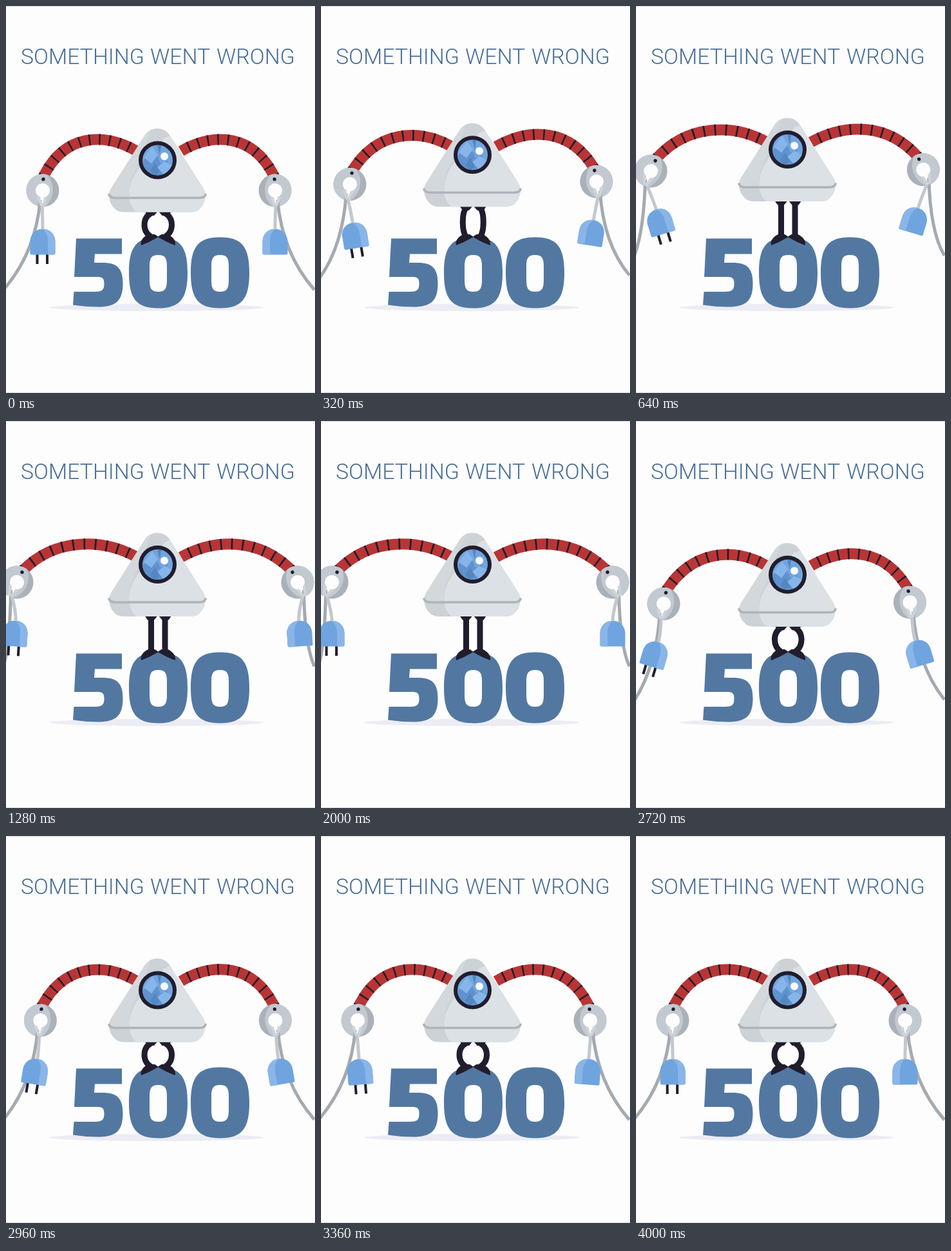
These frames come from a looping animation (480x600 px, 4.08 s). An HTML page:

```html
<!DOCTYPE html>
<html lang="en">
<head>
<meta charset="utf-8">
<title>Something went wrong</title>
<style>
  html, body { margin: 0; width: 100%; height: 100%; overflow: hidden; background: #fdfdfd; }
  svg { display: block; width: 480px; height: 600px; }
  .title { font: 300 33.8px Roboto, "Open Sans", sans-serif; fill: #476d97; }
  .line { fill: none; }
  .dark { fill: #211d2d; }
  .arm { stroke: #b93535; stroke-width: 17; }
  .bands { stroke: #211d2d; stroke-width: 17; stroke-dasharray: .16 .84; stroke-dashoffset: -.8; }
  .cable { stroke: #a5aab1; stroke-width: 5; }
  .cord { stroke: #c3c8cf; stroke-width: 5; }
  .leg { stroke: #211d2d; stroke-width: 9; }
</style>
</head>
<body>
<svg viewBox="0 0 480 600">
  <defs>
    <clipPath id="shell">
      <path id="outline" d="M160 294C160 288 163 283 167 277L214 203C219 194 226 190 235 190S251 194 256 203L303 277C307 283 310 288 310 294C309 302 307 308 303 312Q298 319.5 287 319.5H183Q172 319.5 167 312C163 308 161 302 160 294Z"/>
    </clipPath>
    <clipPath id="lens"><circle cx="235.5" cy="239" r="23.5"/></clipPath>
    <path id="zero" fill-rule="evenodd" d="M0-55C35-55 45.5-39 45.5 0S35 55 0 55S-45.5 39-45.5 0S-35-55 0-55ZM0-27.5C-11-27.5-13.5-22-13.5-10V11C-13.5 24-11 29.5 0 29.5S13.5 24 13.5 11V-10C13.5-22 11-27.5 0-27.5Z"/>
    <path id="foot" class="dark" d="M210 371C208 364 213 358 221 354H231L237 358L222 366Z"/>
    <path id="hip" class="dark" d="M215.5 318.5H235.5L230 325H220Z"/>
  </defs>

  <path d="M0 .5H480M0 599.5H480" stroke="#d6d8df"/>
  <text class="title" y="90"><tspan x="23">SOMETHING</tspan><tspan x="224">WENT</tspan><tspan x="327">WRONG</tspan></text>

  <ellipse cx="234" cy="467.5" rx="167" ry="5.5" fill="#ececf4"/>
  <g fill="#5278a2" role="img" aria-label="500">
    <path d="M109 360.5H180V384.500H138L137 398H150C173 398 181.500 407 181.500 430C181.500 457 171 466.500 143 466.500Q123 466.500 104 463.500L105.500 443H138C149 443 152.500 440 152.500 431C152.500 422 150 420 141 420H106Z"/>
    <use href="#zero" x="236.500" y="413.500"/>
    <use href="#zero" x="332.500" y="413.500"/>
  </g>

  <g id="left"></g>
  <g id="right" transform="matrix(-1 0 0 1 475 0)"></g>

  <path class="line leg" id="legL"/>
  <path class="line leg" id="legR" transform="matrix(-1 0 0 1 472.500 0)"/>
  <use href="#foot"/>
  <use href="#foot" transform="matrix(-1 0 0 1 472.500 0)"/>

  <g id="body">
    <use href="#hip"/>
    <use href="#hip" transform="matrix(-1 0 0 1 472.500 0)"/>
    <use href="#outline" fill="#cdd2d7"/>
    <g clip-path="url(#shell)">
      <path d="M150 300L216 190H226L203 250C193 268 191 275 191 298H150Z" fill="#d3d8dc"/>
      <path d="M191.500 298C191 277 196 268 205 254L246 205L262 198L320 290V325H214C201 322 193 311 191.500 298Z" fill="#dce1e6"/>
    </g>
    <path class="line" d="M159.500 291Q161 297.500 169 297.500H301Q309 297.500 310.500 291" stroke="#afb4bb" stroke-width="3.500"/>
    <circle cx="235.500" cy="239" r="29.500" class="dark"/>
    <g clip-path="url(#lens)">
      <path d="M211 214H260V264H211Z" fill="#72a5de"/>
      <path d="M211 242L220 233L226 243L232 226L240 244L251 239L246 264H211Z" fill="#5f92ce"/>
      <path d="M214 235L227 218L236 231L226 244ZM235 250L246 241L258 247L246 263Z" fill="#86b5e9"/>
      <path d="M224 255L232 243L239 257L231 263ZM235 216L241 216L239 231Z" fill="#5486c0"/>
    </g>
    <circle cx="246" cy="233" r="6" fill="#f8fbff"/>
  </g>
</svg>

<script>
const LOOP = 4080, HALF = LOOP / 2, STEP = 80;
const REST = { x: 57, y: 286 };

// up/down: how long an arm takes to open and close; bow: how late in its reach the hand rises.
const hands = {
  left: { reach: 40, bow: 2.2, up: 860, down: 1140 },
  right: { reach: 35, bow: 1, up: 900, down: 980 }
};

const $ = id => document.getElementById(id);

function ease(time, duration) {
  const u = Math.min(Math.max(time / duration, 0), 1);
  return (1 - Math.cos(Math.PI * u)) / 2;
}

// Goes 0 to 1 in the first half of the loop and back to 0 in the second.
const raised = (t, up, down) => ease(t, up) - ease(t - HALF, down);

// Each move of the arms makes the plugs lag behind, swing once past and settle.
function sway(t) {
  const u = t % HALF;
  const wave = Math.sin(Math.PI * u / 1150) * Math.sin(Math.PI * u / HALF) * (1 - u / HALF);
  return t < HALF ? -wave : wave;
}

function offset(origin, degrees, x, y) {
  const a = degrees * Math.PI / 180, c = Math.cos(a), s = Math.sin(a);
  return [origin[0] + x * c - y * s, origin[1] + x * s + y * c];
}

function buildSide(name) {
  const prongs = name === 'left'
    ? '<path class="dark" d="M-10.500 18h4v16h-4zM5 18h4v16h-4z"/>' : '';
  $(name).innerHTML = `
    <path class="line arm"/><path class="line bands" pathLength="11"/>
    <g class="ring">
      <circle r="25.500" fill="#abb1b9"/>
      <path d="M5-25A25.500 25.500 0 1 0 5 25A34 34 0 0 0 5-25Z" fill="#c3c9d1"/>
      <path d="M-4 5L-2.500 27H2.500L4 5Z" fill="#fdfdfd"/>
      <circle r="11" fill="#fdfdfd"/>
      <circle cy="-17.500" r="2.700" class="dark"/>
    </g>
    <path class="line cable"/><path class="line cord"/>
    <path class="loop" d="M-9 10L-3 24H1L-4 9ZM8 9L4 24H0L3 10Z" fill="#d0d4da"/>
    <g class="plug">${prongs}
      <path id="${name}Case" d="M-19.500 17V-1C-19.500-13-10-20-2-20H2C10-20 19.500-13 19.500-1V17Q19.500 19.500 17 19.500H-17Q-19.500 19.500-19.500 17Z" fill="#6fa4df"/>
      <path d="M2-20C10-20 19.500-13 19.500-1V17Q19.500 19.500 17 19.500H8V-1Q8-14 0-20Z" fill="#8ab5e8"/>
    </g>`;
}

function drawSide(name, t, rise) {
  const part = cls => $(name).querySelector('.' + cls);
  const path = (cls, d) => part(cls).setAttribute('d', d);
  const move = (cls, p, r) => part(cls).setAttribute('transform', `translate(${p}) rotate(${r})`);

  const { reach, bow, up, down } = hands[name];
  const open = raised(t, up, down), turn = 3 + 24 * open;
  const hand = [REST.x - reach * open, REST.y + rise - 19.5 * open ** bow];

  const arm = `M203 ${225 + .85 * rise}C150 ${194 + .75 * rise} ${offset(hand, .85 * turn, 28, -87)} ${offset(hand, turn, 0, -21)}`;
  path('arm', arm);
  path('bands', arm);
  move('ring', hand, turn);
  move('loop', hand, turn);

  const hook = offset(hand, turn, 0, 20), tilt = 30 * sway(t);
  const plug = offset(hand, 18 * sway(t), 0, 80);
  path('cable', `M${offset(hand, turn, -3, 15)}Q${hand[0] - 11} ${hand[1] + 97} -4 ${440 + 1.65 * (hand[1] - REST.y)}`);
  path('cord', `M${hook}Q${offset(plug, tilt, 0, -34)} ${offset(plug, tilt, 0, -18)}`);
  move('plug', plug, tilt);
}

function draw(t) {
  const lift = raised(t, 640, 780), rise = -16.5 * lift;
  const knee = 225.5 - 14 * (1 - lift), hip = 321 + rise;
  $('body').setAttribute('transform', `translate(0 ${rise})`);
  const leg = `M225.500 ${hip}C${knee} ${hip + 8} ${knee} 349 225.500 358`;
  $('legL').setAttribute('d', leg);
  $('legR').setAttribute('d', leg);
  for (const name in hands) drawSide(name, t, rise);
}

function frame() {
  const t = performance.now() % LOOP;
  draw(Math.floor(t / STEP) * STEP);
  requestAnimationFrame(frame);
}

Object.keys(hands).forEach(buildSide);
frame();
</script>
</body>
</html>
```
